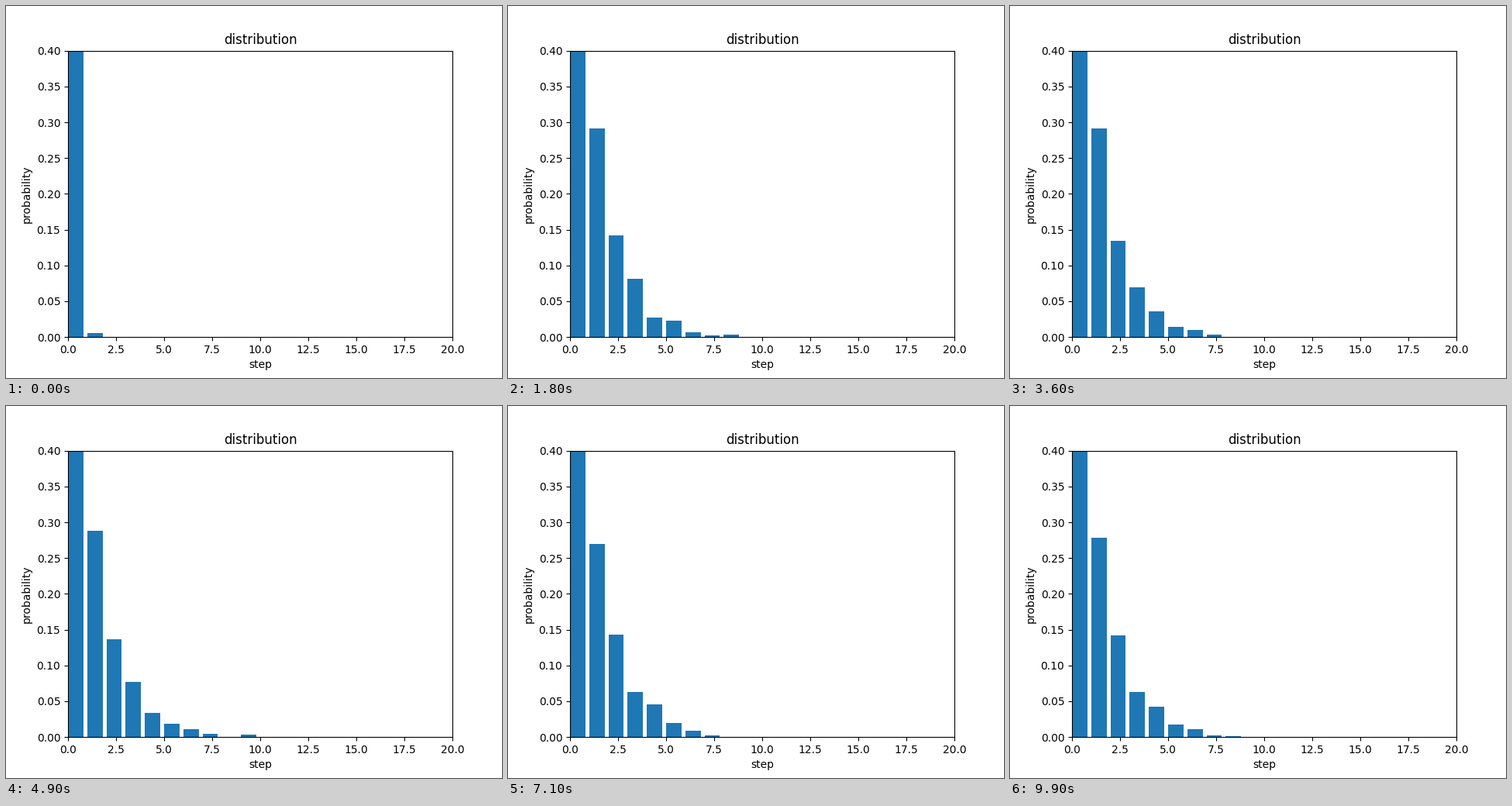
Recreate the animation shown at these times as a matplotlib script. Size 640 by 480 pixels, loop 10 s.

```python
import numpy as np
import matplotlib.pyplot as plt
from matplotlib.animation import FuncAnimation

FRAMES = 100
STEPS = 20
WALKERS = 2000


def expected(t):
    """Walkers leave step 0 at once, then fill a geometric tail."""
    released = 1 - 0.994 * np.exp(-8 * t)
    first = released * (0.645 + 0.12 * np.exp(1 - t))
    ratio = 0.5 * (1 - np.exp(-max(t - 1, 0) / 2.5))
    weights = np.r_[1, first * ratio ** np.arange(STEPS - 1)]
    return weights / weights.sum()


def distribution(t):
    """Share of walkers on each step, with sampling noise."""
    rng = np.random.default_rng(500 + t)
    return rng.multinomial(WALKERS, expected(t)) / WALKERS


fig, ax = plt.subplots(figsize=(6.4, 4.8), dpi=100)
bars = ax.bar(np.arange(STEPS), distribution(0), width=0.8, align="edge",
              color="#1f77b4")
ax.set(xlim=(0, 20), ylim=(0, 0.4), title="distribution",
       xlabel="step", ylabel="probability")


def update(t):
    for bar, height in zip(bars, distribution(t)):
        bar.set_height(height)
    return list(bars)


anim = FuncAnimation(fig, update, frames=FRAMES, interval=1000 // 10,
                     repeat=True, repeat_delay=0, blit=False)
plt.show()
```
